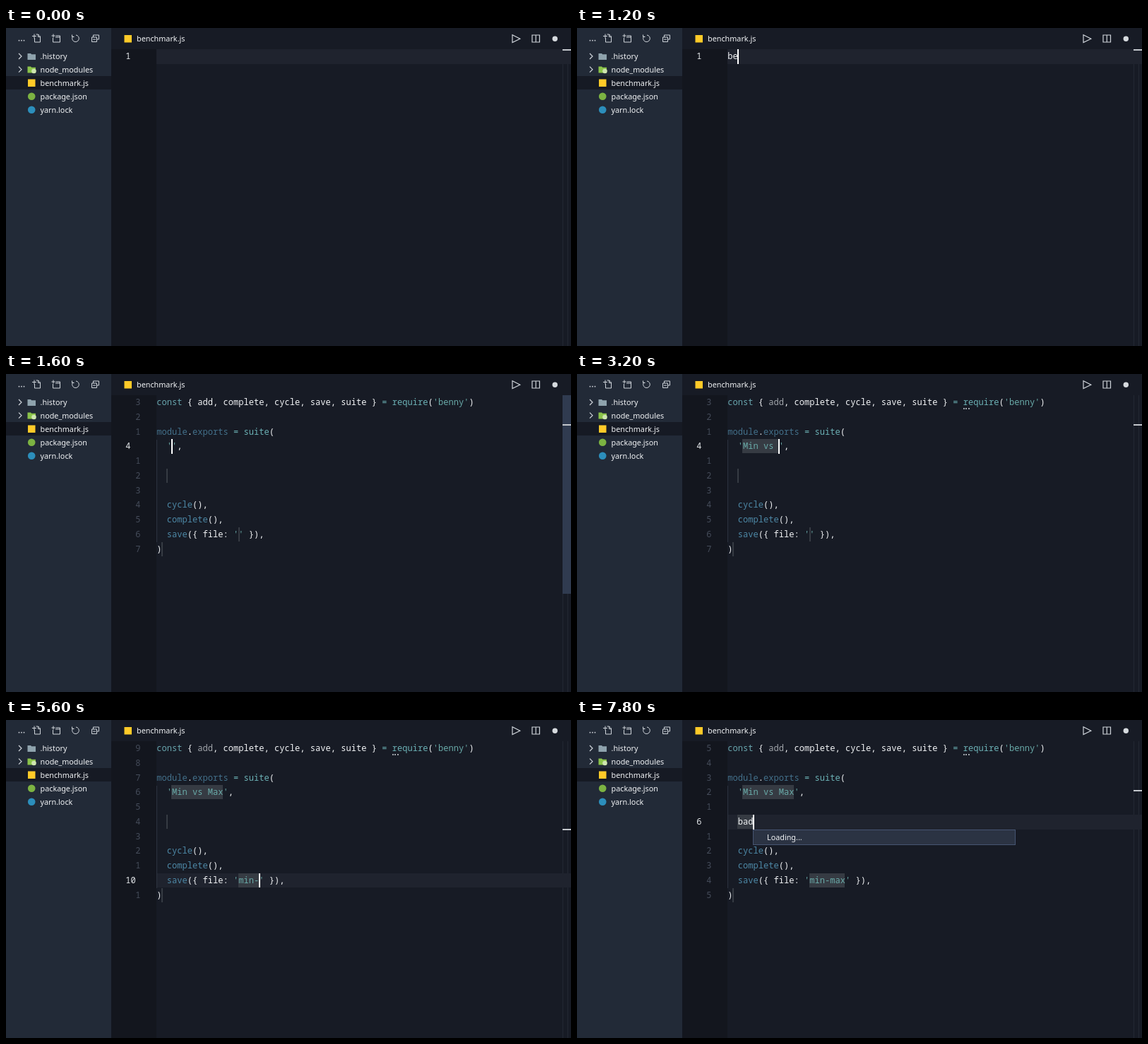
An HTML page that plays this animation: 800 by 450 pixels, repeating every 8 s.

```html
<!DOCTYPE html>
<html lang="en">
<head>
<meta charset="utf-8">
<title>Code editor</title>
<style>
html, body { margin: 0; width: 100%; height: 100%; overflow: hidden; background: #171b25; }
#stage { position: relative; width: 800px; height: 450px; overflow: hidden; background: #171b25;
  color: #f1f3f5; font: 10.8px/19px "Noto Sans", "Open Sans", sans-serif; }
#stage div, #stage svg { position: absolute; }
#side { left: 0; top: 0; width: 149px; height: 450px; background: #222a37; }
#active { left: 0; top: 68px; width: 149px; height: 19px; background: #161a24; }
#gutter { left: 149px; top: 30px; width: 64px; height: 420px; background: #13161e; }
#ruler { left: 788px; top: 30px; width: 6px; height: 420px; border: solid #232833; border-width: 0 1px; }
.label { white-space: pre; }
#editor, #popup { font: 12.08px/20.72px "Noto Sans Mono", "DejaVu Sans Mono", monospace;
  font-variant-ligatures: none; white-space: pre; }
#editor { left: 0; top: 0; }
#editor .row { left: 213.3px; }
.num { width: 60px; left: 130.6px; text-align: right; color: #454c5a; }
.now { left: 169.3px; color: #e4e7ea; }
.line { left: 213px; width: 587px; height: 20.7px; background: #1f232e; }
.hole { height: 20px; margin-left: -.7px; background: #363b43; }
.caret { width: 2px; height: 20.7px; margin-left: -.7px; background: #fff; }
.mark { left: 788px; width: 12px; height: 2px; background: #c3c7cc; }
.thumb { left: 788px; top: 30px; width: 12px; height: 281px; background: #303b50; }
.guide { left: 213px; top: 92.5px; width: 1px; height: 145px; background: #2c3340; }
.hint { left: 547px; top: 48px; width: 9px; height: 2px;
  background: repeating-linear-gradient(90deg, #9fa5ab 0 2px, transparent 2px 3.5px); }
.k { color: #68a5ad; } .s { color: #69aaa8; } .m { color: #43708a; }
.f { color: #4d88a6; } .u { color: #6bb0b4; } .d { color: #a0a4aa; }
#popup { left: 235px; top: 51px; width: 369px; height: 247px; border: 1px solid #465167; background: #2b3343; }
#popup .pick { left: 0; top: 0; width: 369px; height: 20.7px; background: #3e4b60; }
#popup .bar { right: 0; top: 0; width: 9px; height: 149px; background: #404c60; }
#popup .item { left: 20.8px; }
#popup b { color: #6fb8af; }
#popup svg { left: 5px; }
#load { left: 249px; top: 155px; width: 370px; height: 20px; line-height: 20px; text-indent: 19px;
  border: 1px solid #465572; background: #2b3343; }
</style>
</head>
<body>
<div id="stage">
  <div id="side"></div>
  <div id="active"></div>
  <div id="gutter"></div>
  <div id="ruler"></div>
  <div id="editor"></div>
  <div id="popup"></div>
  <div id="load">Loading...</div>
  <svg width="800" height="130" fill="none" stroke="#cfd4da" stroke-width="1">
    <g fill="#cfd4da" stroke="none">
      <circle cx="18.5" cy="17.7" r=".9"/><circle cx="22" cy="17.7" r=".9"/><circle cx="25.5" cy="17.7" r=".9"/>
    </g>
    <path d="M40.5 14v6h8v-8l-3-3h-3M45.5 9v3.5h3M37 11.5h6M40 8.5v6"/>
    <path d="M66.5 14v6h10v-9h-6M64.5 11h5M67 8.500v5M70 13h6.5"/>
    <path d="M95 11.500a4.800 4.800 0 1 0 4-1.500M93.500 9.500v3h3"/>
    <path d="M123.500 13v-3h8v6h-3M121.500 13h7v6.500h-7zM123 16.200h4"/>
    <path d="M18 36l4 4-4 4M18 54.700l4 4-4 4" stroke-width="1.2"/>
    <path d="M717 9.800v10.800l10.800-5.400z" stroke-width="1.2"/>
    <path d="M745 10h10.500v10h-10.500zM750.250 10v10" stroke-width="1.2"/>
    <circle cx="777.3" cy="15.3" r="3.7" fill="#d6dade" stroke="none"/>
    <g stroke="none">
      <path d="M30.500 36h4.500l1.200 1.300h5.800v7.700h-11.500z" fill="#8fa3ad"/>
      <path d="M30.500 54.500h4.500l1.200 1.300h5.800v7.700h-11.500z" fill="#8bc34a"/>
      <circle cx="39.5" cy="61" r="3.3" fill="#cfe6b0"/>
      <path d="M31 72.500h10.500v10.500h-10.500zM167.500 10h10.500v10.500h-10.500z" fill="#ffca28"/>
      <circle cx="36.2" cy="96.7" r="5.3" fill="#7cb342"/>
      <circle cx="36.2" cy="115.7" r="5.3" fill="#2c8ebb"/>
    </g>
  </svg>
</div>
<script>
const COL = 7.25, ROW = 20.72, LEFT = 213.3, TOP = 30.3;
const STEP = 200, LOOP = 8000;
const $ = id => document.getElementById(id);
const box = (cls, css, text = '') => `<div class="${cls}" style="${css}">${text}</div>`;
const tint = (cls, text) => `<span class="${cls}">${text}</span>`;
const rowTop = row => `top:${TOP + row * ROW}px;`;
const at = (row, col) => `${rowTop(row)}left:${LEFT + col * COL}px;`;
const typed = (text, count) => text.slice(0, Math.max(0, count));

const names = ['benchmark.js', '.history', 'node_modules', 'benchmark.js', 'package.json', 'yarn.lock'];
names.forEach((name, i) => $('stage').insertAdjacentHTML('beforeend',
  box('label', i ? `left:48.5px;top:${11.5 + i * 18.9}px` : 'left:185px;top:5px', name)));

// Tildes enclose the matched letters; the first character picks the icon.
const items = ['s~ben~ny', 'v~Be~foreU~n~loadEvent', 'c~b~as~en~ame', 'v~B~yteL~en~gthQueuingStrategy',
  'v~B~ool~e~a~n~', 'vSVGFEFunc~BE~leme~n~t', 'v~B~iquadFilt~e~r~N~ode', 'k~B~AD~N~AM~E~',
  'v~B~as~e~AudioCo~n~text', 'cis~B~ool~e~a~n~', 'vAudio~B~ufferSourc~eN~ode',
  'kZ_~BE~ST_COMPRESSIO~N~'];
const icons = {
  s: '<path d="M1.5 5.5h10v10h-10z" stroke="#c5cad0"/>',
  v: '<path d="M3 6.500h-2v8h2M10 6.500h2v8h-2M3.500 10.500l3.500-2 2.500 1v2.500l-3.500 2-2.500-1zM3.500 10.500l2.500 1 3.500-2M6 11.500v2.500" stroke="#62b3e8"/>',
  c: '<path d="M6.500 5l5 2.500v6l-5 2.500-5-2.500v-6zM1.500 7.500l5 2.500 5-2.500M6.500 10v6" stroke="#a9b0ba"/>',
  k: '<path d="M1 6.500h11v8h-11zM3.500 9.500h6M3.500 11.800h6" stroke="#c5cad0"/>'
};
const icon = (key, top) =>
  `<svg width="14" height="21" style="top:${top}px" fill="none">${icons[key]}</svg>`;
const bold = text => text.split('~').map((part, i) => i % 2 ? `<b>${part}</b>` : part).join('');
$('popup').innerHTML = '<div class="pick"></div><div class="bar"></div>' +
  items.map((item, i) => icon(item[0], i * ROW) + box('item', `top:${i * ROW}px`, bold(item.slice(1)))).join('') +
  box('', 'left:79px;top:0;color:#d3d8de', 'Log output to console (User Snippet)') +
  '<svg style="left:345px;top:4px" width="13" height="13" fill="none" stroke="#8b95a3">' +
  '<circle cx="6.5" cy="6.5" r="5.3"/><path d="M6.5 5.5v4M6.5 3.5v1"/></svg>';

function numbers(count, row) {
  let out = '';
  for (let i = 0; i < count; i++) {
    out += i === row ? box('now', rowTop(i), i + 1) : box('num', rowTop(i), Math.abs(i - row));
  }
  return out;
}

function hole(row, col, length) {
  return box('hole', `${at(row, col)}width:${Math.max(2, length * COL)}px`);
}

function page(lines, row, col, caretOn, under) {
  return under + numbers(lines.length, row) +
    lines.map((line, i) => box('row', rowTop(i), line)).join('') +
    box('mark', `top:${30 + row * 13.8}px`) +
    (caretOn ? box('caret', at(row, col)) : '');
}

function firstPage(n) {
  const word = typed('ben', n < 3 ? 0 : n < 6 ? 1 : n - 4);
  return page([word], 0, word.length, n > 1, box('line', rowTop(0)));
}

function snippetPage(n) {
  const title = typed('Min vs Max', n - 9);
  const file = typed('min-max', n - 24);
  const word = typed('bad', n - 35);
  const row = n < 21 ? 3 : n < 33 ? 9 : 5;
  const col = { 3: 3 + title.length, 9: 16 + file.length, 5: 2 + word.length }[row];
  const checked = n > 8;
  const caretOn = ![23, 24, 35].includes(n);
  const lines = [
    tint('k', 'const') + ' { ' + (checked ? tint('d', 'add') : 'add') + ', complete, cycle, save, suite } ' +
      tint('u', '=') + ' ' + tint('u', 'require') + '(' + tint('s', "'benny'") + ')',
    '',
    tint('m', 'module') + '.' + tint('m', 'exports') + ' ' + tint('u', '=') + ' ' + tint('u', 'suite') + '(',
    '  ' + tint('s', `'${title}'`) + ',',
    '',
    '  ' + word,
    '',
    '  ' + tint('f', 'cycle') + '(),',
    '  ' + tint('f', 'complete') + '(),',
    '  ' + tint('f', 'save') + '({ file: ' + tint('s', `'${file}'`) + ' }),',
    ')'
  ];
  const under = (row > 3 ? box('line', rowTop(row)) : '') +
    '<div class="guide"></div>' + hole(3, 3, title.length) + hole(5, 2, word.length) +
    hole(9, 16, file.length) + hole(10, 1, 0) + (n < 10 ? '<div class="thumb"></div>' : '');
  return page(lines, row, col, caretOn, under) + (checked ? '<div class="hint"></div>' : '');
}

let shown = -1;
const start = performance.now();
function tick() {
  const n = Math.floor((performance.now() - start) % LOOP / STEP);
  if (n !== shown) {
    shown = n;
    $('editor').innerHTML = n < 8 ? firstPage(n) : snippetPage(n);
    $('popup').hidden = n !== 7;
    $('load').hidden = n !== 39;
  }
  requestAnimationFrame(tick);
}
tick();
</script>
</body>
</html>
```
